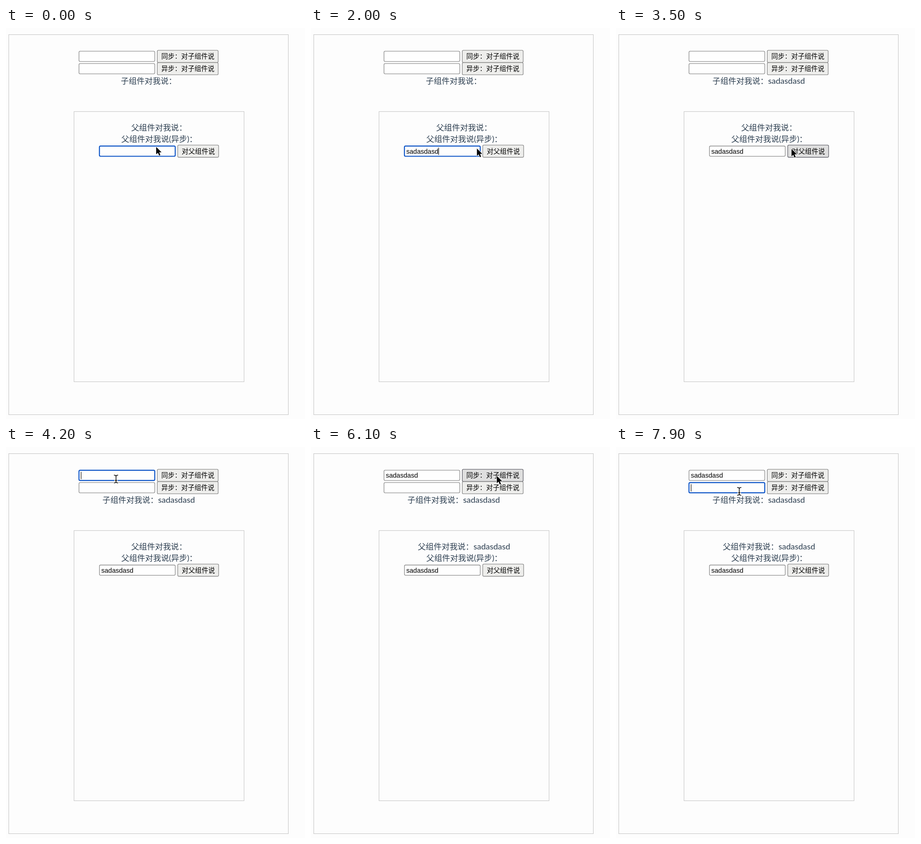
An HTML page that plays this animation: 655 px wide and 855 px high, repeating every 8000 ms.

```html
<!DOCTYPE html>
<html lang="zh-CN">
<head>
<meta charset="utf-8">
<title>父子组件通信</title>
<style>
html, body { margin: 0; width: 100%; height: 100%; overflow: hidden; background: #fdfdfd; }
svg { display: block; width: 655px; height: 855px; }
.panel { fill: none; stroke: #c6c6c6; stroke-width: 1.1; }
.label { font: 17.45px Lato, "Noto Sans CJK SC", sans-serif; fill: #2c3e50; }
.value { font-size: 18px; }
.field { fill: #fefefe; stroke: #777; stroke-width: 1.1; }
.field.focus { stroke: #0b53c6; stroke-width: 2.2; }
.typed { font: 14.55px "Liberation Sans", Arial, sans-serif; fill: #000; }
.button rect { fill: #eeeeec; stroke: #777; stroke-width: 1.1; }
.button.hover rect { fill: #dfdfdf; stroke: #4a4a54; }
.button text { font: 14.55px "Noto Sans CJK SC", sans-serif; fill: #000; }
#caret { stroke: #000; stroke-width: 1.1; }
</style>
</head>
<body>
<svg id="stage" viewBox="0 0 655 855">
  <rect class="panel" x="6" y="14.5" width="612.5" height="831"/>
  <rect class="panel" x="149" y="182.7" width="372.5" height="590.8"/>
  <text class="label" x="252.5" y="248.8">父组件对我说(异步)：</text>
  <g id="form"></g>
  <line id="caret" y1="-7.7" y2="8.3"/>
  <path id="arrow" d="M0 0V16.2L3.8 12.8 6.5 18.9 9.2 17.7 6.6 11.7H11.7Z" stroke="#fff" stroke-width="1.6" stroke-linejoin="round" paint-order="stroke"/>
  <g id="beam" fill="none" stroke-linecap="round">
    <path id="bar" d="M-4-8.5Q0-8.5 0-5.5Q0-8.5 4-8.5M0-5.5V5.5M-4 8.5Q0 8.5 0 5.5Q0 8.5 4 8.5M-2 3H2" stroke="#fff" stroke-width="3.2"/>
    <use href="#bar" style="stroke:#000"/>
    <path d="M-4-8.5Q0-8.5 0-5.5Q0-8.5 4-8.5M0-5.5V5.5M-4 8.5Q0 8.5 0 5.5Q0 8.5 4 8.5M-2 3H2" stroke="#000" stroke-width="1.5"/>
  </g>
</svg>
<script>
const LOOP = 8000, STEP = 100, WORD = 'sadasdasd';
const $ = id => document.getElementById(id);
const form = $('form');

function add(parent, tag, attrs, text = '') {
  const node = document.createElementNS('http://www.w3.org/2000/svg', tag);
  for (const key in attrs) node.setAttribute(key, attrs[key]);
  node.textContent = text;
  return parent.appendChild(node);
}

// mid is the vertical centre of the row
function makeField(x, mid, opts) {
  const box = add(form, 'rect', { class: 'field', x, y: mid - 11.2, width: 166, height: 22.4, rx: 2.4 });
  const text = add(form, 'text', { class: 'typed', x: x + 4, y: mid + 5.2 });
  return { x, mid, w: 166, h: 22.4, box, text, ...opts };
}

function makeButton(x, mid, w, caption) {
  const node = add(form, 'g', { class: 'button' });
  add(node, 'rect', { x, y: mid - 13.3, width: w, height: 26.6, rx: 2.4 });
  add(node, 'text', { x: x + 8.8, y: mid + 5.4 }, caption);
  return { x, mid, w, h: 26.6, node };
}

function makeMessage(center, y, caption, shownAt) {
  const label = add(form, 'text', { class: 'label', y }, caption);
  const value = add(form, 'text', { class: 'label value', y }, WORD);
  return { center, label, value, shownAt };
}

const fields = [
  makeField(159.9, 62, { focus: 4100, blur: 5900, start: 4300, pace: 110 }),
  makeField(159.9, 89, { focus: 7700, blur: LOOP, start: Infinity, pace: 1 }),
  makeField(204.7, 269.3, { focus: 300, blur: 2300, start: 800, pace: 120, focused: true })
];
const buttons = [
  makeButton(331.4, 62, 133.4, '同步：对子组件说'),
  makeButton(331.4, 89, 133.4, '异步：对子组件说'),
  makeButton(376.2, 269.3, 89.6, '对父组件说')
];
const messages = [
  makeMessage(312.5, 121.6, '子组件对我说：', 2500),
  makeMessage(335.2, 224.2, '父组件对我说：', 6000)
];

// time, x, y
const path = [
  [0, 329, 260], [100, 329, 260], [500, 327, 263], [1700, 327, 263],
  [2300, 400, 264], [2700, 400, 264], [3300, 398, 281], [3400, 396, 280],
  [4000, 241, 70], [5100, 241, 70], [5500, 374, 67], [5900, 405, 63],
  [6100, 407, 63], [6900, 400, 66], [7600, 270, 97], [LOOP, 270, 97]
];

function pointer(t) {
  const i = path.findIndex(p => p[0] > t);
  const [t0, x0, y0] = path[i - 1], [t1, x1, y1] = path[i];
  const u = (t - t0) / (t1 - t0), e = u * u * (3 - 2 * u);
  return [x0 + (x1 - x0) * e, y0 + (y1 - y0) * e];
}

const inside = (r, x, y) => x > r.x && x < r.x + r.w && Math.abs(y - r.mid) < r.h / 2;
const show = (node, on) => node.setAttribute('visibility', on ? 'visible' : 'hidden');

function render(t) {
  const [x, y] = pointer(t);
  let caretOn = false;

  for (const f of fields) {
    const count = Math.max(0, Math.min(WORD.length, Math.floor((t - f.start) / f.pace) + 1));
    f.text.textContent = WORD.slice(0, count);
    const active = t < f.blur && (f.focused || t >= f.focus);
    f.box.classList.toggle('focus', active);
    if (!active) continue;
    const since = count ? f.start + (count - 1) * f.pace : f.focus;
    caretOn = Math.floor((t - since) / 500) % 2 === 0;
    const end = f.x + 4.6 + (count ? f.text.getComputedTextLength() : 0);
    $('caret').setAttribute('transform', `translate(${end} ${f.mid})`);
  }
  show($('caret'), caretOn);

  for (const b of buttons) b.node.classList.toggle('hover', inside(b, x, y));

  for (const m of messages) {
    const on = t >= m.shownAt, w = m.label.getComputedTextLength();
    const left = m.center - (w + (on ? m.value.getComputedTextLength() : 0)) / 2;
    m.label.setAttribute('x', left);
    m.value.setAttribute('x', left + w);
    show(m.value, on);
  }

  const overText = t > 3400 && fields.some(f => inside(f, x, y));
  show($('beam'), overText);
  show($('arrow'), !overText);
  for (const id of ['beam', 'arrow']) $(id).setAttribute('transform', `translate(${x} ${y})`);
}

function tick() {
  const t = performance.now() % LOOP;
  render(Math.floor(t / STEP) * STEP);
  requestAnimationFrame(tick);
}
tick();
</script>
</body>
</html>
```
